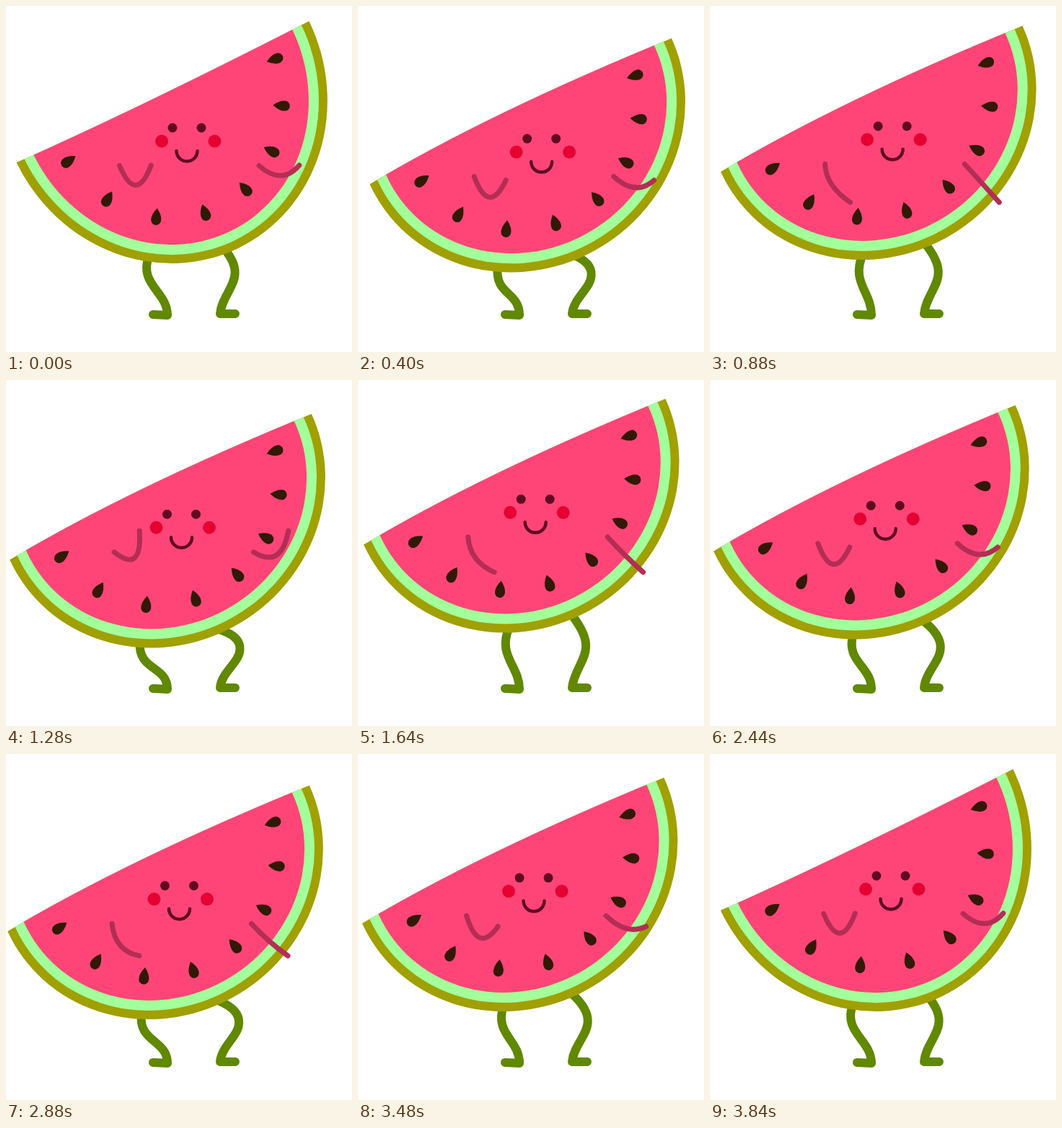
Recreate the animation shown at these times as an HTML page with a canvas. Size 480 by 480 pixels, loop 3.88 s.

```html
<!DOCTYPE html>
<html>
<head>
<meta charset="utf-8">
<title>Dancing watermelon</title>
<style>
  html, body { margin: 0; height: 100%; overflow: hidden; background: #fff; }
  canvas { display: block; }
</style>
</head>
<body>
<canvas id="stage" width="480" height="480"></canvas>
<script>
const ctx = document.getElementById('stage').getContext('2d');
const LOOP = 3880, STEP = 40, TAU = Math.PI * 2, DEG = TAU / 360;

const mix = (a, b, k) => a + (b - a) * k;
const smooth = k => { k = Math.min(1, Math.max(0, k)); return k * k * (3 - 2 * k); };
const wave = (t, start, period) => Math.cos(TAU * (t - start) / period);

function stroke(path, color, width) {
  ctx.strokeStyle = color;
  ctx.lineWidth = width;
  ctx.stroke(new Path2D(path));
}

function ellipse(x, y, rx, ry, color) {
  ctx.fillStyle = color;
  ctx.beginPath();
  ctx.ellipse(x, y, rx, ry, 0, 0, TAU);
  ctx.fill();
}

// The feet stay put while the hips and knees follow the body.
function drawLegs(x, y, straight) {
  const sink = y - 170, green = '#608800';
  const hipX = 204 - 1.1 * sink + 0.5 * (x - 244) - 10 * straight, hipY = y + 177;
  const kneeX = 318 + 0.4 * sink, kneeY = 371 + 0.15 * sink;
  stroke(`M${hipX} ${hipY} C${hipX - 15 + 0.7 * sink} ${hipY + 40} 224 396 224 429 L204 428`, green, 12);
  stroke(`M296 ${y + 160} Q${kneeX + 1} ${kneeY - 18} ${kneeX} ${kneeY}
    C${kneeX} ${kneeY + 18} 299 405 297 427 L318 427`, green, 12);
}

// Eight seeds spread along an arc, tips towards the middle.
function drawSeeds(rx, ry) {
  const seed = new Path2D('M12.5 0 Q3 -7.5 -4 -7 A7 7 0 0 0 -4 7 Q3 7.5 12.5 0');
  ctx.fillStyle = '#321905';
  for (let i = 0; i < 8; i++) {
    const angle = (170.4 - 23.1 * i - 4 * Math.sin(Math.PI * i / 7)) * DEG;
    ctx.save();
    ctx.translate(rx * Math.cos(angle), ry * Math.sin(angle));
    ctx.rotate(angle + Math.PI);
    ctx.fill(seed);
    ctx.restore();
  }
}

// A half ellipse; its cut edge bulges and its rind leans while it is limp.
function drawSlice(x, y, straight) {
  const a = mix(232.5, 225.4, straight), b = mix(219, 241, straight);
  const bulge = mix(8.5, -3, straight), lean = mix(0.02, 0, straight);
  ctx.save();
  ctx.translate(x + mix(-29, -33.5, straight), y + mix(-38, -50, straight));
  ctx.rotate(-25.8 * DEG);
  ctx.transform(1, 0, -lean, 1, 0, 0);
  ctx.clip(new Path2D(`M${-a} 0 Q-40 ${-2 * bulge} ${a} 0 A${a} ${b} 0 0 1 ${-a} 0`));
  ctx.fillStyle = '#a0a000';
  ctx.fillRect(-300, -100, 600, 400);
  ellipse(0, 0, a - 12, b - 12, '#a2ff9a');
  ellipse(0, 0, a - 26, b - 26, '#ff4578');
  drawSeeds(a * 0.72, b * 0.74);
  ctx.restore();
}

function drawFace() {
  const dark = '#600a22';
  for (const x of [-20, 20]) ellipse(x, 0, 6.5, 6.5, dark);
  for (const x of [-35, 38.5]) ellipse(x, 18.5, 9, 9, '#e60032');
  stroke('M-14.5 32 A14.5 14.5 0 0 0 14.5 32', dark, 4.5);
}

function drawArm(x, elbowX, elbowY, handX, handY) {
  stroke(`M${x} 52.5 q${elbowX} ${elbowY} ${handX} ${handY}`, '#b42d55', 7);
}

function drawArms(swing) {
  const bend = swing * swing, handY = 6 + 39 * swing + 5 * bend;
  drawArm(-93.5, 20 - 18 * swing, 55 - 22 * bend, 44 - 8 * bend, handY);
  drawArm(100, 30 - 8 * swing, 28 - 4 * bend, 56 - 7 * bend, handY);
}

function draw(t) {
  // The slice starts and ends straight, and hangs limp while dancing.
  const straight = 1 - smooth(t / 320) + smooth((t - 3540) / 300);
  const bob = wave(t, 2839, 512);
  const sway = 11 * (1 - smooth((t - 900) / 600));
  const x = mix(244 - 4 * bob + sway, 251, straight);
  const y = mix(172 + 12.3 * bob + sway * wave(t, 400, 1000), 169, straight);

  ctx.clearRect(0, 0, 480, 480);
  ctx.lineCap = ctx.lineJoin = 'round';
  drawLegs(x, y, straight);
  drawSlice(x, y, straight);
  ctx.save();
  ctx.translate(x, y);
  drawFace();
  drawArms(mix(1.1 * wave(t, 2948, 680), -0.17, straight));
  ctx.restore();
}

function tick() {
  draw(Math.floor(performance.now() % LOOP / STEP) * STEP);
  requestAnimationFrame(tick);
}
tick();
</script>
</body>
</html>
```
